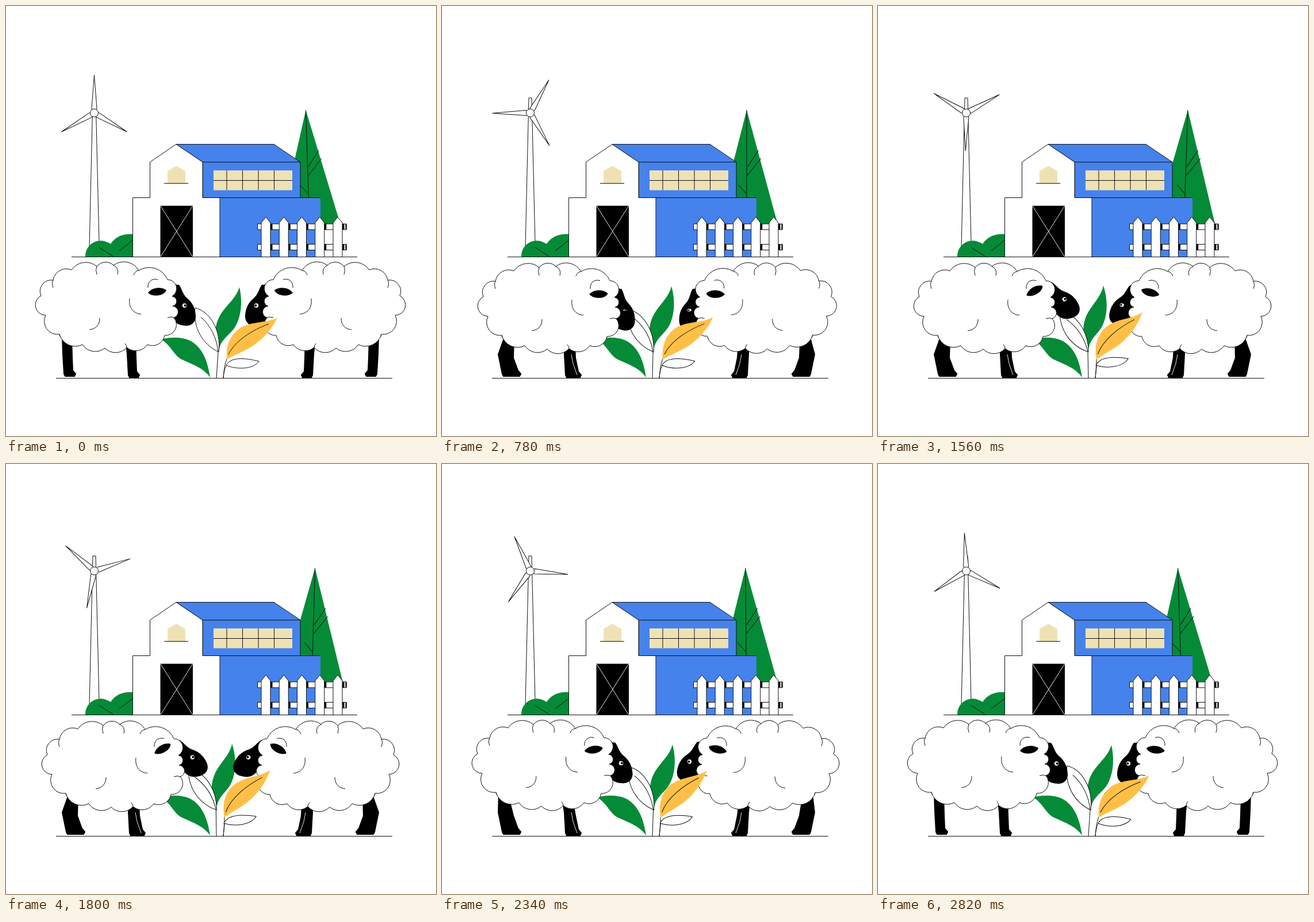
An HTML page that plays this animation: 748 px wide and 748 px high, repeating every 2880 ms.

```html
<!DOCTYPE html>
<html lang="en">
<head>
<meta charset="utf-8">
<title>Farm with two sheep</title>
<style>
html, body { margin: 0; width: 100%; height: 100%; overflow: hidden; background: #fff; }
svg { display: block; width: 100vw; height: 100vh; }
.line { fill: none; stroke: #111; stroke-width: 1; }
.white { fill: #fff; stroke: #111; stroke-width: 1; }
.blue { fill: #4582ec; stroke: #111; stroke-width: 1; }
.green { fill: #058b37; }
.cream { fill: #eee2b5; }
.leg { stroke: #000; stroke-width: 2; stroke-linejoin: round; }
.pale { fill: none; stroke: #fff; stroke-width: .9; }
</style>
</head>
<body>
<svg viewBox="0 0 748 748">
  <g id="tree">
    <path class="green" d="M476 384L521.5 181L583 384Z"/>
    <path class="line" d="M521.5 181L526.5 340M526 280L544 251M526 295L549 265M511 311L526 327"/>
  </g>

  <path class="white" d="M145 419L151 160H156L162 412"/>
  <g id="rotor"></g>
  <circle class="white" cx="153.5" cy="186" r="7"/>
  <path class="green" d="M138 436C138 413 162 400 182 414C192 399 207 396 221 397V436Z"/>
  <path class="line" d="M162 420L187 436M197 426L220 408"/>

  <path fill="#4582ec" d="M372 333.5H547V436.5H372Z"/>
  <path class="blue" d="M342 271.5H512V333.5H342ZM296 240.5H466L512 271.5H342Z"/>
  <path class="line" d="M512 333.5H547"/>
  <path class="white" d="M220.5 436.5V333.5H250.5V271.5L296 240.5L342 271.5V333.5H372V436.5"/>
  <path class="cream" d="M281 308V287L296.5 278L312 287V308ZM361 286H498V320.5H361Z"/>
  <path class="line" d="M275 308.5H317M361 303.5H498M384 286V320M411.5 286V320M439 286V320M466.5 286V320"/>
  <path d="M268.5 347.5H325V436.5H268.5Z"/>
  <path class="pale" d="M269 348L324.5 436M324.5 348L269 436"/>
  <g id="fence"></g>
  <path class="line" d="M114 436.5H611M87 647.5H672"/>

  <path class="green" d="M355 646C350 612 339 592 320 582C304 575 285 576 270 580C288 591 291 607 306 615C326 624 344 630 355 646Z"/>
  <path class="white" id="stem"/>
  <g id="mid"><path class="green" d="M370 602C361 574 363 554 373 537C385 518 400 509 406 489C412 515 409 541 398 559C388 574 372 580 370 602Z"/></g>
  <g id="pod">
    <path class="white" d="M329 525C354 531 375 563 370 602C341 588 325 559 329 525Z"/>
    <path class="line" d="M339 541C356 556 367 578 369 602"/>
  </g>
  <g id="left"></g>
  <g transform="matrix(-1 0 0 1 746 0)"><g id="right"></g></g>
  <g id="small"><path class="white" d="M383 625C391 610 415 612 440 618C430 632 402 633 383 625Z"/></g>
  <g id="gold">
    <path fill="#ffbf47" d="M384 615C382 589 391 570 409 559C430 548 453 552 472 542C463 561 451 575 434 588C416 601 400 605 384 615Z"/>
    <path class="line" d="M387 606C399 582 428 564 457 553"/>
  </g>
</svg>
<script>
const LOOP = 2880, STEP = 60;
const $ = id => document.getElementById(id);
const move = (el, s) => el.setAttribute('transform', s);

function ease(a, b, p) {
  const x = Math.max(0, Math.min(1, (p - a) / (b - a)));
  return x * x * (3 - 2 * x);
}
// Rises from 0 to 1 between a and b, falls back between c and d.
const hold = (p, a, b, c, d) => ease(a, b, p) - ease(c, d, p);

// Fleece: one scallop between each pair of points, flatter where the edge runs level.
const knots = [
  [61, 504], [82, 477], [114, 459], [158, 453], [187, 451], [231, 460], [281, 476], [289, 505],
  [290, 522], [292, 542], [276, 573], [246, 589], [210, 594], [172, 595], [133, 589], [93, 571], [69, 538]
];
const fleece = `M${knots[0]}` + knots.map(([x, y], i) => {
  const [nx, ny] = knots[(i + 1) % knots.length];
  const chord = Math.hypot(nx - x, ny - y), level = (nx - x) / chord;
  const r = chord * (.505 + .17 * level * level);
  return `A${r} ${r} 0 0 1 ${nx} ${ny}`;
}).join('') + 'Z';
const curls = 'M82 477Q79 482 82 490M158 453Q155 459 158 467M187 451Q197 456 194 467' +
  'M231 460Q224 461 222 468M247 490C246 478 256 473 264 476' +
  'M215 509C213 524 221 535 235 536M163 543C163 555 156 562 145 563' +
  'M292 542Q288 540 281 542M210 594Q210 591 207 587M93 571L94 575';

// Spans of the loop in which each sheep leans forward and lifts its head.
const sheep = {
  left: { walk: [0, .22, .62, .83], lift: [.36, .48, .6, .83], blink: .8 },
  right: { walk: [0, .36, .62, .91], lift: [.42, .6, .65, .88], blink: .4 }
};

for (const id in sheep) $(id).innerHTML = `
  <path class="leg back"/><path class="leg front"/><path class="pale crease"/>
  <g class="head">
    <path d="M284 484L301 485C306 491 307 502 316 509C324 516 330 526 330 541C329 553 320 557 311 556C300 555 292 551 288 540L282 515Z"/>
    <g class="eye"><circle r="3.7" fill="#fff"/><circle cx="1.2" r="2"/></g>
  </g>
  <g class="body"><path class="white" d="${fleece}"/><path class="line" d="${curls}"/></g>
  <path class="ear" d="M-16 2C-10 -7 6 -10 16 -3C14 6 -6 11 -16 2Z"/>`;

$('rotor').innerHTML = [0, 120, 240].map(a =>
  `<path class="white" d="M-2 0L-4.5 -8L0 -66L4.5 -8L2 0" transform="rotate(${a})"/>`).join('');

const posts = [0, 1, 2, 3, 4].map(i => 444 + i * 31.25);
$('fence').innerHTML = [379, 414.5].map(y =>
  `<path class="white" d="M437.5 ${y}H592V${y + 10}H437.5Z"/>` +
  posts.map(x => `<path d="M${x + 16} ${y}h3.5v10h-3.5z"/>`).join('') +
  `<path d="M590.5 ${y}h2v10h-2z"/>`).join('') +
  posts.map(x => `<path class="white" d="M${x} 436.5V377L${x + 8} 367L${x + 16} 377V436.5Z"/>`).join('');

// Hip, knee and foot each span from a left to a right x.
function drawLeg(el, hip, knee, foot, ground) {
  el.setAttribute('d', `M${hip[0]} 575L${knee[0]} 606L${foot[0]} ${ground - 4}L${foot[0] + 2} ${ground}` +
    `H${foot[1] - 2}L${foot[1]} ${ground - 4}L${foot[1] - 5} ${ground - 10}L${knee[1]} 612L${hip[1]} 575Z`);
}

function drawSheep(id, p) {
  const { walk, lift, blink } = sheep[id], part = name => $(id).querySelector('.' + name);
  const x = 11 * hold(p, ...walk), nod = hold(p, 0, .25, lift[0], lift[1]), up = hold(p, ...lift);
  const hx = x * .85, hy = 6 * nod - 2 * up, turn = 6 * nod - 22 * up;
  move(part('body'), `translate(${x} ${x / 6})`);
  move(part('head'), `translate(${hx} ${hy}) rotate(${turn} 290 505)`);
  move(part('eye'), `translate(310.5 521) scale(1 ${1 - blink * nod})`);
  move(part('ear'), `translate(${263 + hx} ${497 + hy * .7}) rotate(${turn})`);

  const s = hold(p, 0, .15, .8, .97), knee = 226 + 6 * s, toe = 232 + 10 * s;
  drawLeg(part('back'), [98 + x, 114 + x], [99 - s, 115 + 9 * s], [101 + 4 * s, 121 + 16 * s], 644);
  drawLeg(part('front'), [208 + x / 2, 225 + x / 2], [211 + 2 * s, knee], [213 + 2 * s, toe], 646);
  part('crease').setAttribute('d', `M${knee - 7} 606L${knee - 4} 622L${toe - 7} 642`);
  part('crease').setAttribute('opacity', s);
}

const swing = (id, dx, turn, x, y) => move($(id), `translate(${dx} 0) rotate(${turn} ${x} ${y})`);

function draw(now) {
  const u = Math.floor(now % LOOP / STEP) * STEP / LOOP;
  const p = u - .033 * Math.sin(Math.PI * u);
  const wave = .5 - .5 * Math.cos(2 * Math.PI * p), pull = hold(p, .2, .55, .75, 1);

  move($('rotor'), `translate(153.5 186) rotate(${120 * p})`);
  const skew = 17.5 * wave / 270;
  move($('tree'), `matrix(1 0 ${-skew} 1 ${451 * skew} 0)`);

  swing('mid', -4 * wave, -5 * wave, 370, 602);
  swing('pod', -4 * wave, -7 * wave, 369, 602);
  swing('gold', -4 * pull, -6.5 * pull, 384, 614);
  swing('small', -4 * pull, -5 * pull, 383, 625);
  const b = 369 - 4 * wave, g = 384 - 4 * pull;
  $('stem').setAttribute('d', `M${b} 602L366 647.5H378C379 635 380 625 ${g} 614M378 647C379 637 380 631 ${g} 624`);
  for (const id in sheep) drawSheep(id, p);
}

const start = performance.now();
function tick() {
  draw(performance.now() - start);
  requestAnimationFrame(tick);
}
tick();
</script>
</body>
</html>
```
